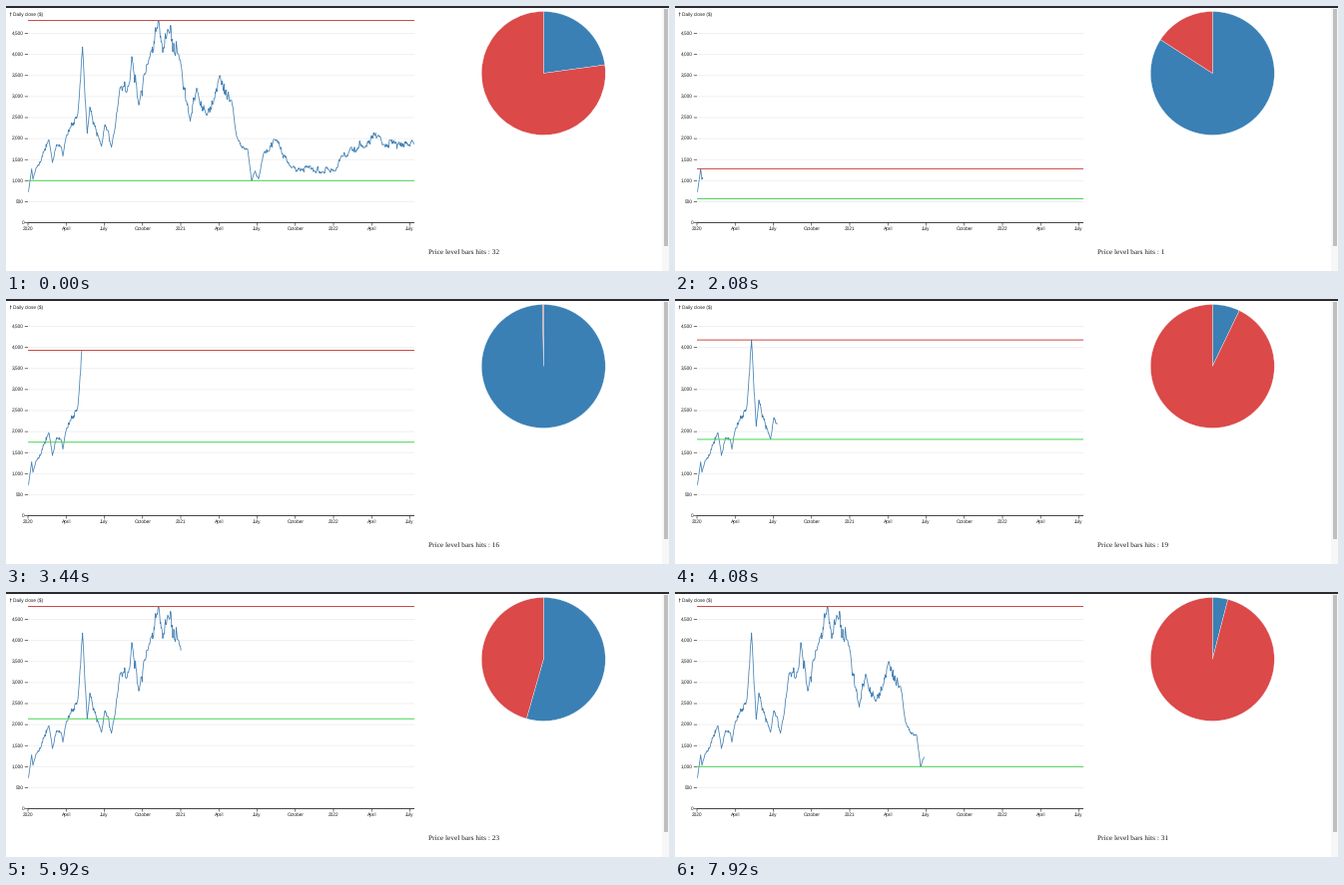
Recreate the animation shown at these times as a matplotlib script. Size 664x266 px, loop 8 s.

```python
import numpy as np
import matplotlib.pyplot as plt
from matplotlib.animation import FuncAnimation
from matplotlib.patches import Rectangle, Wedge

W, H, DPI = 664, 266, 100
STEP, FRAMES = 80, 100
PX = 72 / DPI                      # one pixel in points
LEFT, RIGHT, BASE = 22, 409, 217.5
QUARTER = 38.25                    # width of three months
PER_DOLLAR = 0.0422
CLEARED, RESTART = 1680, 2080      # the page is empty in between
BLUE, RED, GREEN, INK = "#3a80b5", "#db4949", "#4bd455", "#1a1a1a"

plt.rcParams["text.hinting"] = "no_hinting"

# main turning points of the price: x in pixels, close in dollars
TURNS = np.array([
    (22.5, 730), (25.7, 1282), (27, 1030), (30, 1300), (43, 1973),
    (46.5, 1430), (50.5, 1850), (55.5, 1800), (57, 1580), (60.5, 2080),
    (72, 2600), (76.7, 4180), (81.3, 2130), (84, 2750), (95.7, 1815),
    (99, 2330), (105.7, 1800), (114, 3200), (124, 3350), (126, 3950),
    (133, 2800), (143, 3870), (153, 4810), (157, 4050), (162, 4600),
    (173, 4000), (184.5, 2420), (191, 3200), (201, 2550), (214, 3500),
    (226, 2900), (231, 2050), (242, 1750), (246, 1000), (249.5, 1230),
    (253, 1040), (258, 1650), (269, 1980), (286, 1300), (330, 1230),
    (336, 1600), (373, 2080), (377, 1850), (409, 1870)])


def y_of(price):
    return BASE - price * PER_DOLLAR


def make_prices():
    """Daily wobble around the trend, pinned at the turning points."""
    rng = np.random.default_rng(7)
    keys, values = TURNS.T
    x = np.union1d(np.arange(LEFT + 0.5, RIGHT, QUARTER / 91), keys)
    wobble = np.zeros(x.size)
    for i in range(1, x.size):
        wobble[i] = 0.7 * wobble[i - 1] + rng.normal(0, 0.027)
    gap = np.abs(x[:, None] - keys).min(axis=1)
    wobble = np.clip(wobble, -0.06, 0.06) * np.minimum(gap / 3, 1)
    return x, np.minimum(np.interp(x, keys, values) * (1 + wobble),
                         values.max())


def make_bars(price):
    """Upper bar follows new highs; lower bar restarts below it and follows lows."""
    bars, high, low = [], 0, 0
    for p in price:
        if p > high:
            high, low = p, p / 2.25
        low = min(low, p)
        bars.append((high, low))
    return bars


X, PRICE = make_prices()
BARS = make_bars(PRICE)

fig = plt.figure(figsize=(W / DPI, H / DPI), dpi=DPI, facecolor="white")
ax = fig.add_axes([0, 0, 1, 1])
ax.set(xlim=(0, W), ylim=(H, 0))
ax.axis("off")


def line(x, y, color, width, z=2):
    return ax.plot(x, y, color=color, lw=width * PX, zorder=z, snap=False,
                   solid_capstyle="butt", solid_joinstyle="round")[0]


def text(x, y, s, size=4.7, font="Liberation Sans", ha="left"):
    return ax.text(x, y, s, fontsize=size * PX, fontfamily=font, ha=ha,
                   color=INK)


def box(x, y, w, h, color, z=1):
    return ax.add_patch(Rectangle((x, y), w, h, fc=color, lw=0, zorder=z))


def draw_page():
    box(0, 0, W, 1.8, "#2b2a31", 12)
    box(657, 1.8, 7, H, "#f7f7f7")
    box(659, 3, 3.6, 238, "#bfbfbf")

    for price in range(0, 5000, 500):
        y = y_of(price)
        line([LEFT, RIGHT], [y, y], "#ededed", 0.8, 1)
        line([18.8, LEFT], [y, y], INK, 0.6)
        text(18, y + 1.7, f"{price:,}", ha="right")
    line([LEFT, RIGHT], [BASE, BASE], INK, 0.8)

    for k in range(11):
        x = LEFT + k * QUARTER
        line([x, x], [BASE, BASE + 3], INK, 0.6)
        name = (2020 + k // 4, "April", "July", "October")[k % 4]
        text(x, 225.2, name, ha="center")

    line([4.7, 4.7], [6.8, 10.3], INK, 0.5)
    line([4, 4.7, 5.4], [7.7, 6.8, 7.7], INK, 0.5)
    text(7, 10.4, "Daily close ($)")


draw_page()
curve = line([], [], "#4682b4", 0.8, 3)
top_bar = line([LEFT, RIGHT], [0, 0], "#cb4a47", 1, 4)
low_bar = line([LEFT, RIGHT], [0, 0], GREEN, 1, 4)
blue, red = [ax.add_patch(Wedge((538.3, 67.5), 62, -90, 270, fc=c, ec="white",
                                lw=0.3 * PX, zorder=3)) for c in (BLUE, RED)]
counter = text(423, 249.2, "", 7.4, "Liberation Serif")
blank = box(0, 3, 656, H, "white", 10)


def head_at(t):
    if t < CLEARED:
        return RIGHT
    return np.interp(t, [2000, 2080, 2960, 5040, 6880, 7920],
                     [22.5, 27.6, 56, 142.3, 211, 249.5])


def hits_at(head):
    """Hits pile up only while the price pushes one of the bars."""
    return int(np.interp(head, [26, 43, 60, 77, 94, 96, 147, 153, 230, 246, 253],
                         [1, 7, 7, 17, 17, 19, 19, 23, 23, 31, 32]))


def draw(i):
    t = i * STEP
    head = head_at(t)
    blank.set_visible(CLEARED <= t < RESTART)

    n = np.searchsorted(X, head, side="right")
    curve.set_data(np.append(X[:n], head),
                   y_of(np.append(PRICE[:n], np.interp(head, X, PRICE))))

    high, low = BARS[n - 1]
    top_bar.set_ydata([y_of(high)] * 2)
    low_bar.set_ydata([y_of(low)] * 2)

    # the pie runs slightly ahead of the curve
    now = np.interp(head + 1, X, PRICE)
    share = np.clip((now - low) / (high - low), 0.002, 0.998)
    turn = -90 + 360 * share
    blue.set_theta2(turn)
    red.set_theta1(turn)

    counter.set_text(f"Price level bars hits : {hits_at(head)}")
    return ()


anim = FuncAnimation(fig, draw, frames=FRAMES, interval=STEP,
                     repeat=True, repeat_delay=0)
plt.show()
```
